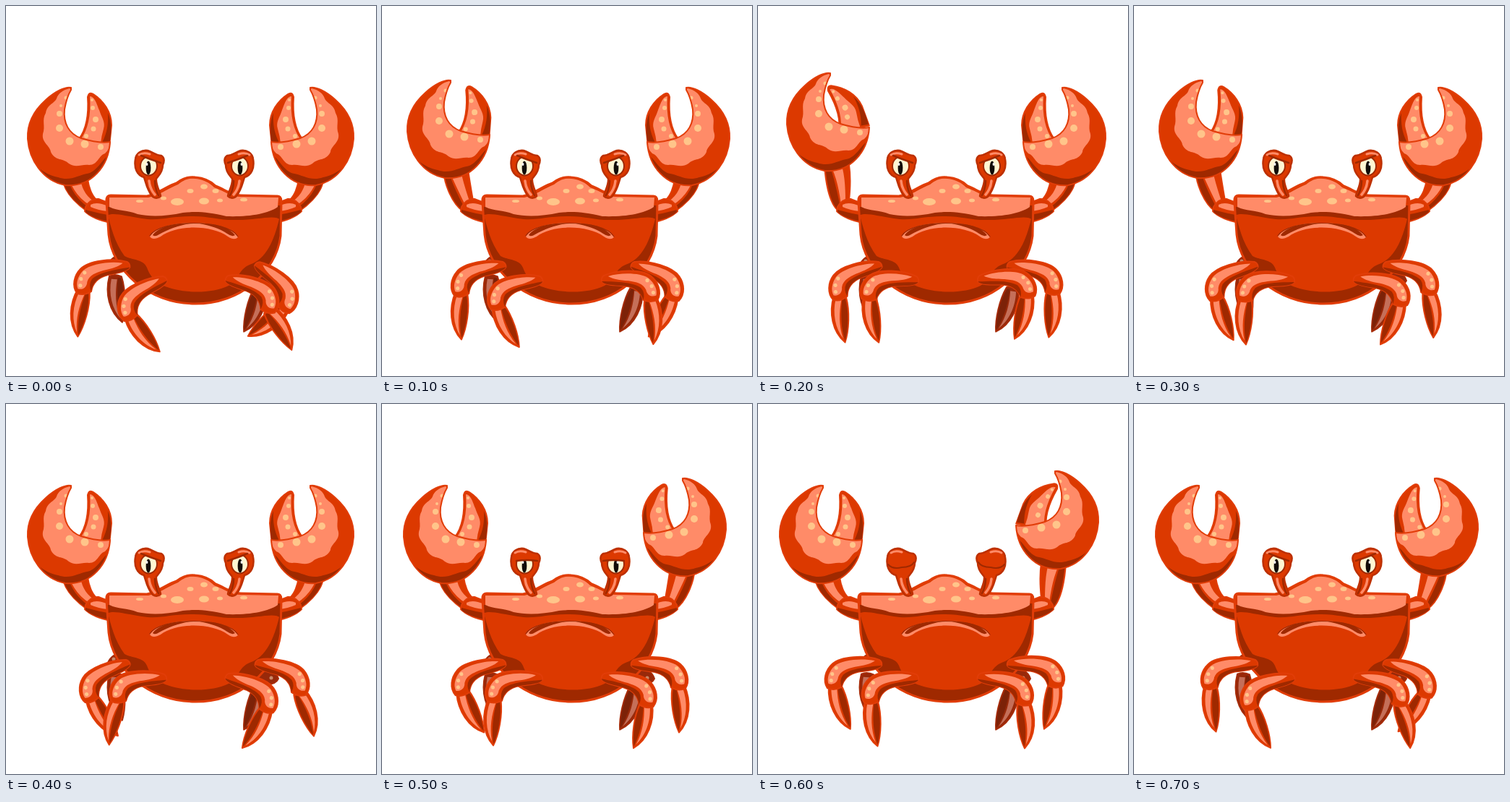
Animation, 512 px wide and 512 px high, one loop 800 ms. Source, as an HTML page:

```html
<!DOCTYPE html>
<html>
<head>
<meta charset="utf-8">
<style>
html, body { margin: 0; height: 100%; overflow: hidden; background: #fff; }
svg { display: block; width: 100%; height: 100%; }
</style>
</head>
<body>
<svg id="stage" viewBox="0 0 512 512"></svg>
<script>
const RED = '#dc3900', DARK = '#9f2900', PINK = '#ff8b68', SPOT = '#ffc58a', EDGE = '#e13d08';
const stage = document.getElementById('stage');

const path = (d, fill, extra = '') => `<path d="${d}" fill="${fill}" ${extra}/>`;
const outline = (d, fill = RED, edge = EDGE, w = 2) =>
  path(d, fill, `stroke="${edge}" stroke-width="${w}" stroke-linejoin="round"`);
const line = (d, color, w) => path(d, 'none', `stroke="${color}" stroke-width="${w}" stroke-linecap="round"`);
const oval = (x, y, rx, ry = rx, fill = SPOT) => `<ellipse cx="${x}" cy="${y}" rx="${rx}" ry="${ry}" fill="${fill}"/>`;
const spots = list => list.map(s => oval(...s)).join('');
const group = (t, s) => `<g transform="${t}">${s}</g>`;
const mirror = (w, s) => group(`matrix(-1 0 0 1 ${w} 0)`, s);
const mix = (a, b, k) => a.map((v, i) => v + (b[i] - v) * k);

// Legs: drawn once in a rest pose, then turned so that each bone joins its two joints
const HIP = [218, 379], KNEE = [154, 405], TIP = [168, 469], BONE = 69;

const thigh =
  outline('M219 374C200 366 166 366 154 376C144 384 139 398 145 409Q154 414 165 409C168 398 176 391 190 389C205 388 219 387 222 382Q223 377 219 374Z') +
  path('M165 409C168 398 176 391 190 389C205 388 219 387 222 382C200 383 179 384 168 392Q162 399 165 409Z', DARK) +
  path('M213 375C195 370 168 371 157 379C149 386 145 395 147 403C154 406 160 402 161 395C165 386 174 384 185 382C197 381 207 379 213 375Z', PINK) +
  spots([[151, 399, 2.6], [153, 390, 2.6], [159, 382, 2.6]]);

const shin = (fill, edge, light, dark) =>
  outline('M147 406C142 430 149 456 168 469C172 452 171 425 164 406Q155 402 147 406Z', fill, edge) +
  path('M159 408C158 430 161 452 168 467C171 450 170 425 163 408Z', dark) +
  path('M150 410C147 431 153 451 165 464C157 446 156 428 158 410Z', light);
const frontShin = shin(RED, EDGE, PINK, DARK);
const backShin = shin('#98290a', '#a62b08', '#c56f59', '#7c2208');

function place(part, a, b, p, q) {
  const turn = Math.atan2(q[1] - p[1], q[0] - p[0]) - Math.atan2(b[1] - a[1], b[0] - a[0]);
  return group(`translate(${p}) rotate(${turn * 180 / Math.PI}) translate(${-a[0]} ${-a[1]})`, part);
}

// Knee that bends outwards to the left between hip and foot
function kneeOf(hip, foot) {
  const dx = foot[0] - hip[0], dy = foot[1] - hip[1], d = Math.hypot(dx, dy);
  const h = Math.sqrt(Math.max(0, BONE * BONE - d * d / 4)) / d;
  return [hip[0] + dx / 2 - dy * h, hip[1] + dy / 2 + dx * h];
}

// The foot walks round four key points, two steps for each side
function leg(hip, feet, n) {
  const i = n >> 1, foot = mix(feet[i], feet[(i + 1) % 4], n % 2 / 2), knee = kneeOf(hip, foot);
  return place(frontShin, KNEE, TIP, knee, foot) + place(thigh, HIP, KNEE, hip, knee);
}

// Right legs are given in mirrored coordinates
const W = 528;
const leftFront = n => leg(HIP, [[215, 481], [168, 469], [142, 475], [166, 477]], n);
const leftMid = n => leg([167, 359], [[99, 461], [121, 469], [157, 462], [129, 453]], n);
const rightFront = n => mirror(W, leg([220, 378], [[131, 479], [174, 464], [203, 479], [159, 480]], n));
const rightMid = n => mirror(W, leg([179, 359], [[196, 459], [126, 462], [101, 463], [133, 453]], n));

const backLegs =
  outline('M168 346Q148 342 141 358Q144 368 164 366Z', '#98290a', '#a62b08') +
  place(backShin, KNEE, TIP, [150, 373], [161, 438]) +
  outline('M346 365Q372 364 377 380Q372 391 350 386Z', '#98290a', '#a62b08') +
  mirror(W, place(backShin, KNEE, TIP, [174, 390], [199, 451])) +
  spots([[149, 353, 2.5, 2.5, '#c88868'], [367, 379, 2.5, 2.5, '#c88868']]);

const BODY = 'M145 262L195 263C212 259 223 249 236 245C246 237 254 236 262 237C274 238 284 243 290 249C303 254 312 262 325 262L374 263Q381 262 381 270L380 318C374 368 325 412 262 412C197 412 147 366 142 316L139 271Q138 262 145 262Z';

const mouth =
  path('M199 319C212 294 306 293 321 320Q316 325 307 319C285 303 236 302 214 319Q203 325 199 319Z', PINK) +
  path('M203 317C212 305 232 301 254 301C238 304 224 309 212 316Q206 320 203 317Z', DARK) +
  path('M268 301C288 300 308 305 317 317Q313 320 306 315C296 308 283 304 268 301Z', DARK) +
  line('M199 318C213 295 306 294 321 319', DARK, 1.2);

const body =
  path(BODY, RED) +
  path('M140 286C145 305 150 327 164 346C175 352 190 350 195 362C199 374 207 382 216 386C240 398 284 399 308 387C325 377 320 363 342 356C362 347 373 320 380 286L380 318C374 368 325 412 262 412C197 412 147 366 142 316Z', DARK) +
  path('M140 278L381 276L380 296C372 288 350 296 320 296C295 297 280 290 255 291C225 291 213 298 188 294C166 291 148 285 140 290Z', DARK) +
  path('M143 265L197 265C214 261 225 252 238 247C248 239 255 238 262 239C274 240 282 245 288 251C302 256 311 264 325 264L377 265L376 278C362 288 335 292 305 291C280 285 263 284 245 286C222 291 200 292 182 288C167 282 155 284 143 278Z', PINK) +
  spots([[237, 271, 9, 5], [274, 270, 7, 4.5], [255, 256, 4.5, 3], [274, 250, 5, 3.5], [290, 256, 4.5, 3],
    [218, 266, 4, 2.5], [296, 269, 4, 2.5], [185, 270, 5, 2], [329, 268, 5, 2.5]]) +
  outline(BODY, 'none', EDGE, 3) + mouth;

// Lid: 0 open, 1 half shut, 2 shut
function eye(lid) {
  const cut = lid ? 'M180 217H216V245H180Z' : 'M180 204L188 206Q200 212 216 219V245H180Z';
  let s = outline('M191 237C181 234 177 224 179 212C180 203 188 199 196 200C203 202 208 207 215 207Q221 211 217 220C217 230 211 235 208 239C207 248 213 256 214 263Q209 268 203 264C195 255 194 246 191 237Z', RED, '#bd3000', 2.5) +
    line('M206 242Q206 253 211 262', DARK, 2.5) +
    line('M198 242Q199 253 206 261', PINK, 3.5) +
    line('M184 206Q190 202 199 205', PINK, 3);
  if (lid < 2) {
    s += `<clipPath id="lid"><path d="${cut}"/></clipPath><g clip-path="url(#lid)">` +
      `<g stroke="${DARK}" stroke-width="2">${oval(197.5, 221.5, 11.5, 13, '#fff6d2')}</g>` +
      oval(197, 224, 3.4, 9.5, '#120c08') + oval(195, 219, 1.4, 2, '#fff') + '</g>' +
      line(lid ? 'M186 217Q200 215 215 217' : 'M187 207Q199 212 214 217', DARK, 2.5);
  } else {
    s += line('M180 222Q186 229 199 226Q212 226 216 219', DARK, 2);
  }
  return s;
}

const finger =
  outline('M101 184C110 172 115 155 113 126Q115 118 121 122C135 131 146 147 146 165L143 194Z') +
  path('M141 148C147 162 146 176 143 192L133 189C140 176 142 162 141 148Z', DARK) +
  path('M103 185C113 172 118 152 116 125C123 125 126 137 129 144C132 154 138 160 135 170Q132 180 131 190Z', PINK) +
  spots([[120, 141, 3], [124, 157, 4], [121, 170, 3.5], [111, 180, 3], [119, 130, 2]]);

const PALM = 'M90 113C83 111 68 118 55 130C37 146 29 164 30 184C32 212 50 242 82 248C118 251 142 222 144 188C132 190 117 187 104 183C87 177 79 162 81 143Q84 126 90 116Z';
const palm =
  path(PALM, RED) +
  path('M43 222C54 232 63 235 72 237C89 243 100 234 112 232C125 230 132 214 141 207C133 233 110 250 82 248Q57 242 43 222Z', DARK) +
  path('M88 114C79 116 72 121 70 128C66 136 57 136 55 148C49 158 55 166 51 177C49 189 61 193 62 202C68 215 79 210 87 218C97 225 106 218 115 220C127 220 128 207 137 204Q143 199 144 188C132 190 117 187 104 183C87 177 79 162 81 143Q84 126 90 116Z', PINK) +
  spots([[83, 127, 2.5], [74, 149, 4], [74, 169, 5], [88, 187, 5.5], [109, 191, 5.5], [131, 195, 4], [76, 138, 2]]) +
  outline(PALM, 'none');

const claw = lift => group(`translate(${10 * lift} ${-20 * lift})`,
  group(`rotate(${-26 * lift ** 4} 125 188)`, finger) + palm);

function arm(lift) {
  const at = (x, y) => `${x + 13 * lift} ${y - 20 * lift}`;
  return outline(`M${at(79, 240)}C${at(80, 257)} 97 273 112 284L126 269Q${at(116, 260)} ${at(113, 240)}Z`) +
    path(`M${at(80, 242)}C${at(82, 260)} 99 274 112 283L114 279Q${at(94, 264)} ${at(88, 246)}Z`, DARK) +
    path(`M${at(90, 246)}Q${at(98, 264)} 115 275L121 270Q${at(108, 261)} ${at(104, 245)}Z`, PINK) +
    outline('M110 278Q117 266 128 267L146 274V300C130 297 116 291 109 284Z') +
    path('M110 282Q128 287 146 290V299C130 296 116 291 110 285Z', DARK) +
    path('M117 275Q126 270 141 277V284Q128 283 117 278Z', PINK);
}

function draw(n) {
  const lift = peak => Math.max(0, 1 - Math.abs(n - peak) / 2);
  const left = lift(2), right = lift(6), lid = n < 7 ? Math.max(0, n - 4) : 0;
  stage.innerHTML = backLegs +
    arm(left) + mirror(518, arm(right)) + body +
    leftMid(n) + rightMid(n) + leftFront(n) + rightFront(n) +
    eye(lid) + mirror(521, eye(lid)) +
    claw(left) + mirror(511, claw(right));
}

let shown = -1;
function tick() {
  const n = Math.floor(performance.now() % 800 / 100);
  if (n !== shown) draw(shown = n);
  requestAnimationFrame(tick);
}
tick();
</script>
</body>
</html>
```
